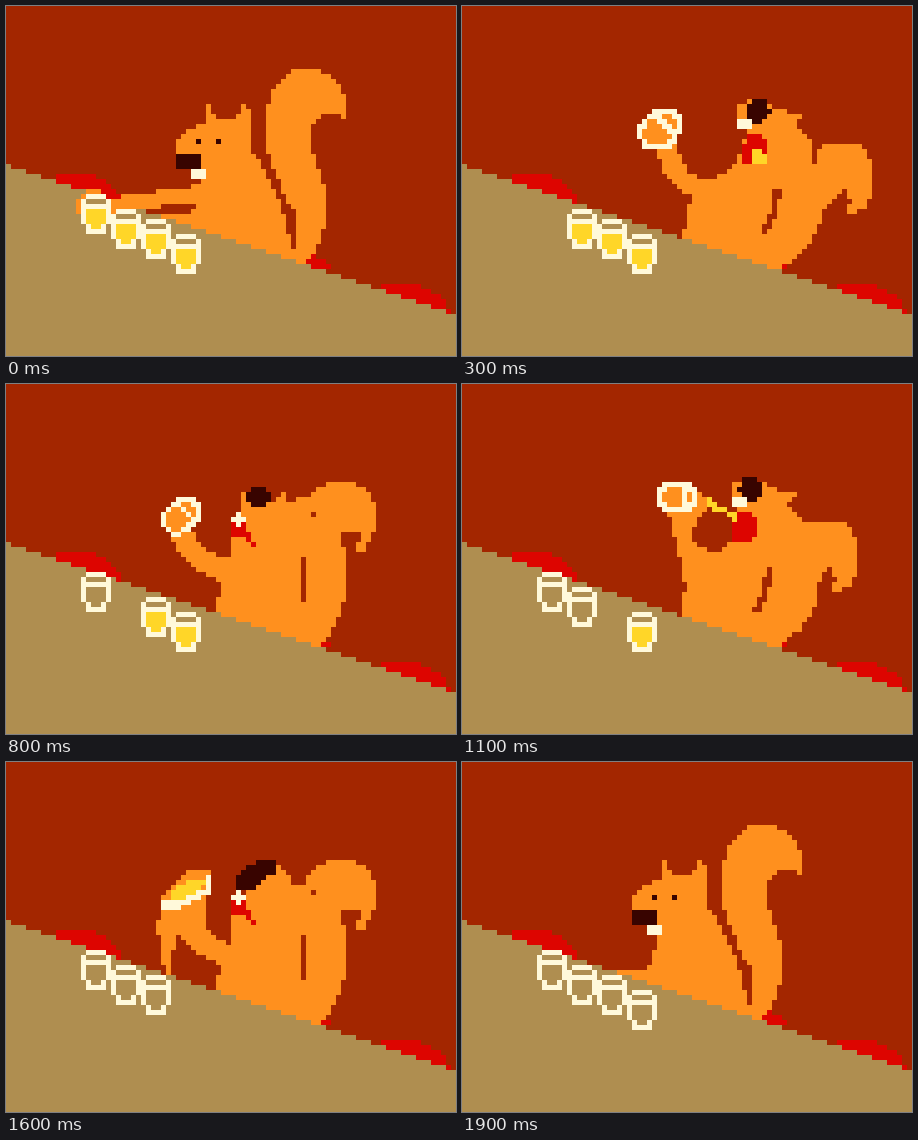
Write an HTML page with a canvas that moves like this. It is 450 px wide and 350 px high and loops after 2.1 s.

```html
<!DOCTYPE html>
<html lang="en">
<head>
<meta charset="utf-8">
<title>Squirrel at the bar</title>
<style>
html, body { margin: 0; width: 100%; height: 100%; overflow: hidden; background: #a32600; }
canvas { display: block; }
</style>
</head>
<body>
<canvas id="stage" width="450" height="350"></canvas>
<script>
const ctx = document.getElementById('stage').getContext('2d');
const CELL = 5, TOP = 3, LOOP = 2100, STEP = 100;
const WALL = '#a32600', TABLE = '#af8e50', RED = '#dd0500', DARK = '#380400';
const FUR = '#ff901e', CREAM = '#fff9da', BEER = '#ffd628';
const mugSpots = [[75, 188], [105, 203], [135, 213], [165, 228]];

function rect(color, x, y, w, h) {
  ctx.fillStyle = color;
  ctx.fillRect(x, y, w, h);
}

// Paints every coarse cell whose centre passes the test.
function cells(color, hit) {
  for (let y = TOP; y < 350; y += CELL)
    for (let x = 0; x < 450; x += CELL)
      if (hit(x + CELL / 2, y + CELL / 2)) rect(color, x, y, CELL, CELL);
}

const toPath = p => p instanceof Path2D ? p : new Path2D(p);

function fill(color, shape, dx = 0) {
  const path = toPath(shape);
  cells(color, (x, y) => ctx.isPointInPath(path, x - dx, y));
}

function stroke(color, shape, width, dx = 0) {
  const path = toPath(shape);
  ctx.lineWidth = width;
  cells(color, (x, y) => ctx.isPointInStroke(path, x - dx, y));
}

function ellipse(x, y, rx, ry = rx, angle = 0) {
  const path = new Path2D();
  path.ellipse(x, y, rx, ry, angle, 0, Math.PI * 2);
  return path;
}

function cushion(x, y, w) {
  fill(RED, `M${x} ${y} h${w * .5} q${w * .45} ${w * .15} ${w * .5} ${w * .45} l${-w} ${-w * .3}z`);
}

function table() {
  for (let i = 0; i < 90; i++) {
    const y = TOP + CELL * (31 + Math.ceil(i / 3));
    rect(TABLE, i * CELL, y, CELL, 350 - y);
  }
}

function mug(x, y, full) {
  const inside = full ? BEER : TABLE;
  rect(CREAM, x, y + 5, 30, 25);
  rect(CREAM, x + 5, y, 20, 40);
  rect(TABLE, x + 5, y + 5, 20, 5);
  rect(inside, x + 5, y + 15, 20, 15);
  rect(inside, x + 10, y + 30, 10, 5);
}

// A glass seen at an angle: an oval with its rim as a chord.
function heldMug(x, y, rx, ry, angle) {
  const oval = ellipse(x, y, rx, ry, angle);
  const c = Math.cos(angle), s = Math.sin(angle), d = rx * .35, h = ry * .9;
  fill(FUR, oval);
  stroke(CREAM, oval, 5.5);
  stroke(CREAM, `M${x + d * c - h * s} ${y + d * s + h * c} L${x + d * c + h * s} ${y + d * s - h * c}`, 5.5);
}

function sitting() {
  fill(FUR, 'M340 113 L340 92 Q330 63 298 63 Q258 66 260 135 Q262 150 280 192 L290 207 290 227 285 262 Q322 255 320 185 Q305 150 305 122 Q308 107 330 108 Z');
  fill(FUR, 'M150 220 L150 210 185 208 195 182 190 165 170 160 170 133 185 123 200 117 200 96 211 113 230 113 240 96 245 113 245 145 Q272 178 282 227 L290 262 200 240 Z');
  rect(DARK, 190, 133, 5, 5);
  rect(DARK, 210, 133, 5, 5);
  fill(DARK, 'M170 148 h25 v15 h-20 l-5 -5z');
  rect(CREAM, 185, 163, 15, 10);
}

function upright(lowered) {
  fill(FUR, 'M248 125 L300 123 Q305 98 335 98 Q372 99 370 142 L358 168 350 168 355 150 335 148 Q340 170 340 205 Q335 240 310 268 L210 245 Q210 200 225 182 L225 152 Z');
  fill(FUR, lowered
    ? 'M235 128 L235 107 250 107 268 120 277 105 282 120 295 110 302 124 290 142 240 142Z'
    : 'M240 130 L262 104 275 104 290 126 250 150Z');
  fill(DARK, lowered ? ellipse(253, 113, 12, 11) : 'M230 128 V115 Q245 98 270 97 V109 L245 128Z');
  rect(WALL, 295, 173, 5, 45);
  rect(WALL, 305, 128, 5, 5);
  fill(RED, 'M225 138 L236 136 251 163 244 163 239 153 225 153Z');
  rect(CREAM, 230, 128, 5, 15);
  rect(CREAM, 225, 133, 15, 5);
}

// Head thrown back; a larger tilt leans further to the right.
function thrownBack(tilt) {
  const head = 7 * tilt, tail = 15 * tilt, jaw = 12 * tilt;
  fill(FUR, 'M340 142 Q360 133 382 138 Q396 150 396 178 Q392 208 370 208 L370 200 375 195 366 183 345 205Z', tail);
  fill(FUR, 'M215 242 L225 197 240 174 345 140 358 185 Q360 248 300 268Z', 3 * tilt);
  fill(FUR, 'M270 115 V98 L289 92 305 102 335 111 325 119 345 140 330 200 240 200 240 175 Q275 165 277 122Z', head);
  stroke(WALL, 'M307 183 Q307 202 294 228', 7, 8 * tilt);
  fill(DARK, ellipse(289, 105, 12), head);
  fill(CREAM, 'M270 113 h10 l5 5 v5 h-15z', head);
  fill(RED, 'M277 127 Q297 130 295 148 L285 158 H270 V138Z', jaw);
  if (tilt) fill(BEER, 'M278 143 h5 l10 5 v10 h-15z', jaw);
}

function gulpArm() {
  stroke(FUR, 'M206 130 Q204 180 250 183', 20);
  heldMug(198, 123, 21, 17, -.8);
}

const poses = {
  sip(k) {
    upright(false);
    fill(FUR, `M${99 + 21 * k} ${157 + 20 * k} Q143 158 160 138 L172 165Z`);
    fill(FUR, 'M158 142 Q165 182 215 202 L225 184 Q198 172 200 155 V130Z');
    fill(FUR, 'M155 148 V137 L185 108 H205 V130 L180 148Z');
    fill(BEER, ellipse(181, 129, 19, 8, -.5));
    stroke(CREAM, 'M157 142 L175 142 202 128 V113', 8);
  },
  lean() {
    thrownBack(0);
    fill(FUR, 'M200 115 Q215 150 222 200 H260 L262 166 Q230 170 230 145 L248 122 240 110Z');
    heldMug(215, 113, 18, 13, 0);
    stroke(BEER, 'M245 115 L255 125 270 130 277 140', 5);
  },
  gulp() {
    thrownBack(1);
    gulpArm();
  },
  far() {
    thrownBack(2);
    gulpArm();
  },
  lower() {
    upright(true);
    stroke(FUR, 'M174 145 Q185 180 225 187', 23);
    heldMug(175, 132, 19, 14, -.75);
  }
};

const rounds = ['sip lean gulp', 'sip far lower', 'lean gulp lower', 'sip lean lower'].map(r => r.split(' '));

function reach([x, y]) {
  stroke(FUR, `M197 187 L${x + 20} ${y + 13}`, 16);
  fill(FUR, ellipse(x + 13, y + 12, 17));
}

function draw(step) {
  const k = Math.floor((step - 1) / 5);
  const pose = k < 0 ? undefined : rounds[k]?.[(step - 1) % 5];
  const drunk = pose ? k : Math.min(k + 1, 4);

  rect(WALL, 0, 0, 450, 350);
  cushion(50, 168, 65);
  cushion(285, 248, 40);
  cushion(375, 278, 70);
  if (pose) poses[pose](k);
  else sitting();
  table();
  if (!pose && drunk < 4) reach(mugSpots[drunk]);
  mugSpots.forEach(([x, y], i) => {
    if (!pose || i !== k) mug(x, y, i >= drunk);
  });
}

const start = performance.now();
let shown = -1;
function tick() {
  const step = Math.floor((performance.now() - start) % LOOP / STEP);
  if (step !== shown) draw(shown = step);
  requestAnimationFrame(tick);
}
tick();
</script>
</body>
</html>
```
